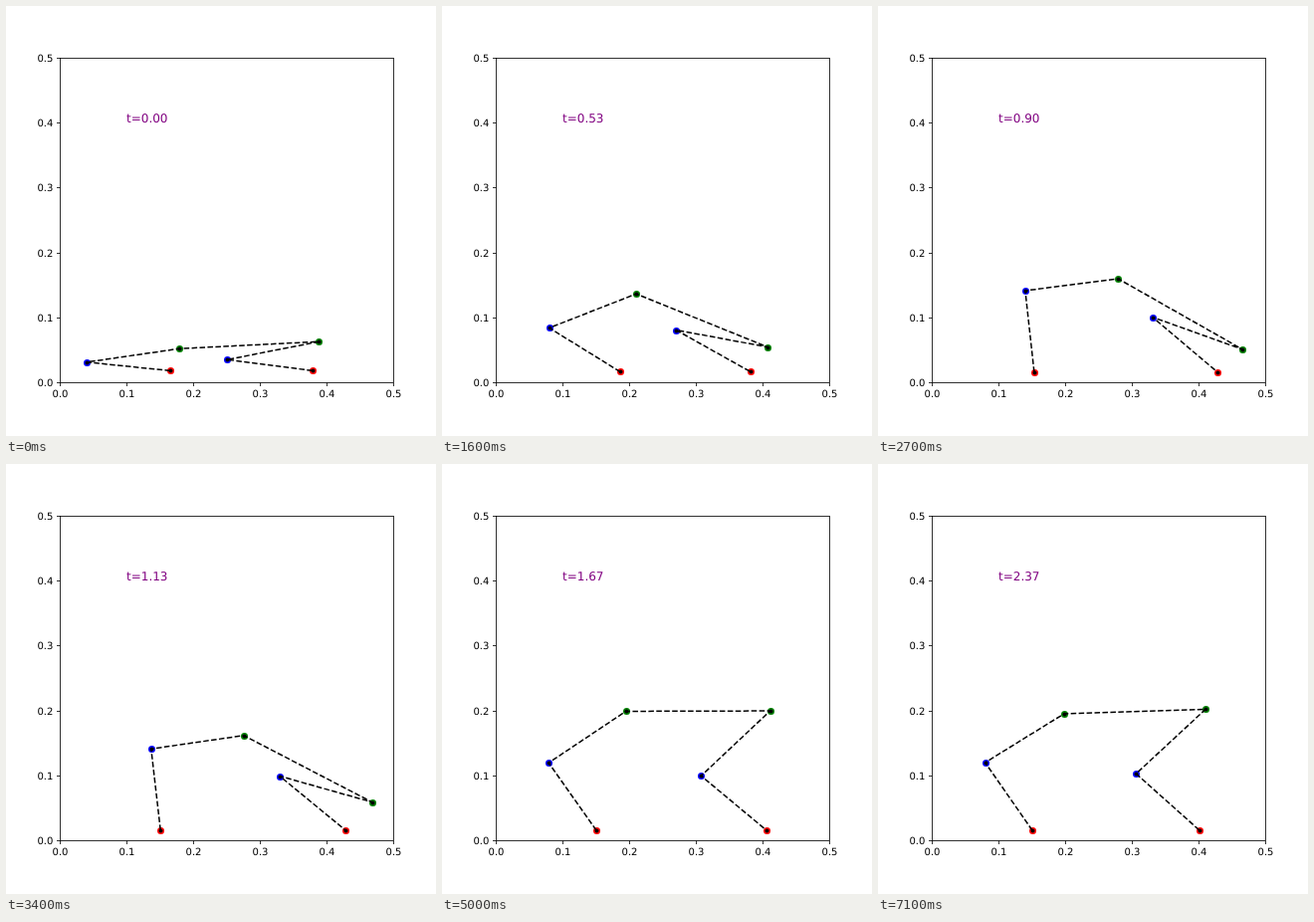
An HTML page for the animation above (7.2 s loop, 432 by 432 pixels).

```html
<!DOCTYPE html>
<html lang="en">
<head>
<meta charset="utf-8">
<title>Walking linkage</title>
<style>
  html, body { margin: 0; width: 100%; height: 100%; overflow: hidden; background: #fff; }
  svg { display: block; width: 432px; height: 432px; }
  text { font-family: "DejaVu Sans", sans-serif; font-size: 10px; text-rendering: geometricPrecision; }
  #clock { font-size: 12px; fill: #800080; }
</style>
</head>
<body>
<svg viewBox="0 0 432 432">
  <rect width="432" height="432" fill="#fff"/>
  <g id="joints"></g>
  <path id="links" fill="none" stroke="#000" stroke-width="1.5" stroke-dasharray="5.55 2.4" stroke-linejoin="round"/>
  <g id="dots"></g>
  <g id="axes" stroke-width="0.8"></g>
  <text id="clock" x="121" y="117"></text>
</svg>
<script>
const STEP = 100, COUNT = 72, RATE = 30;
const $ = id => document.getElementById(id);

function add(parent, tag, attrs, text) {
  const el = document.createElementNS(parent.namespaceURI, tag);
  for (const k in attrs) el.setAttribute(k, attrs[k]);
  if (text) el.textContent = text;
  parent.appendChild(el);
  return el;
}

// Plot units to pixels
const px = x => 54 + 669.6 * x;
const py = y => 378 - 652.32 * y;

const clamp = s => Math.min(1, Math.max(0, s));
const mix = (a, b, s) => a + (b - a) * s;
const smooth = s => s * s * (3 - 2 * s);
const easeIn = s => s * s;
const easeOut = s => 1 - (1 - s) ** 3;
const push = s => s ** 1.2;

// Each leg: foot x, shin angle, thigh angle (degrees); ease leads into the pose
const poses = [
  { at: 0, rear: [0.1658, 174, 8.5], front: [0.3793, 172.4, 11.4] },
  { at: 16, ease: push, rear: [0.1867, 147.6, 21.9], front: [0.3823, 150.1, -10.8] },
  { at: 25, ease: smooth, rear: [0.1538, 96.1, 7.5], front: [0.4286, 139, -20.4] },
  { at: 40, ease: easeIn, rear: [0.1464, 96.9, 10], front: [0.4286, 141.3, -8.5] },
  { at: 50, ease: smooth, rear: [0.1508, 124.5, 34.4], front: [0.4062, 139.5, 44] },
  { at: 71, ease: easeOut, rear: [0.1508, 124.1, 32.4], front: [0.4017, 137.5, 43.6] }
];

function swing([x, y], length, degrees) {
  const a = degrees * Math.PI / 180;
  return [x + length * Math.cos(a), y + length * Math.sin(a)];
}

function leg([x, shinTurn, thighTurn], ground, shin, thigh) {
  const foot = [x, ground], knee = swing(foot, shin, shinTurn);
  return [foot, knee, swing(knee, thigh, thighTurn)];
}

function linkage(step) {
  const i = Math.max(1, poses.findIndex(p => p.at >= step));
  const a = poses[i - 1], b = poses[i];
  const s = b.ease((step - a.at) / (b.at - a.at));
  const blend = side => a[side].map((v, k) => mix(v, b[side][k], s));
  const ground = 0.0153 + 0.0025 * Math.exp(-step / 15);
  const stretch = 0.004 * smooth(clamp((step - 16) / 8));
  return [
    ...leg(blend("rear"), ground, 0.126, 0.1405),
    ...leg(blend("front"), ground, 0.129, 0.14 + stretch).reverse()
  ];
}

function drawAxes() {
  const g = $("axes");
  add(g, "rect", { x: 54.5, y: 52.5, width: 335, height: 326, fill: "none", stroke: "#000" });
  for (let i = 0; i < 6; i++) {
    const v = i / 10, label = v.toFixed(1);
    const x = Math.round(px(v)) + 0.5, y = Math.round(py(v)) + 0.5;
    add(g, "path", { d: `M${x} 378.5v3.5M54.5 ${y}h-3.5`, stroke: "#000" });
    add(g, "text", { x, y: 392.6, "text-anchor": "middle" }, label);
    add(g, "text", { x: 47.3, y: y + 3.5, "text-anchor": "end" }, label);
  }
}

const colors = ["red", "blue", "green", "green", "blue", "red"];
const joints = colors.map(fill => add($("joints"), "circle", { r: 3.5, fill }));
const dots = colors.map(() => add($("dots"), "circle", { r: 2 }));

function draw(step) {
  const points = linkage(step).map(([x, y]) => [px(x), py(y)]);
  points.forEach(([x, y], i) => {
    for (const el of [joints[i], dots[i]]) {
      el.setAttribute("cx", Math.round(x) + 0.5);
      el.setAttribute("cy", Math.round(y) + 0.5);
    }
  });
  $("links").setAttribute("d", "M" + points.map(p => p.map(n => n.toFixed(2))).join("L"));
  $("clock").textContent = "t=" + (step / RATE).toFixed(2);
}

let start = null, shown = 0;
function tick(now) {
  if (start === null) start = now;
  const step = Math.floor(Math.max(0, now - start) / STEP) % COUNT;
  if (step !== shown) draw(shown = step);
  requestAnimationFrame(tick);
}

drawAxes();
draw(0);
requestAnimationFrame(tick);
</script>
</body>
</html>
```
